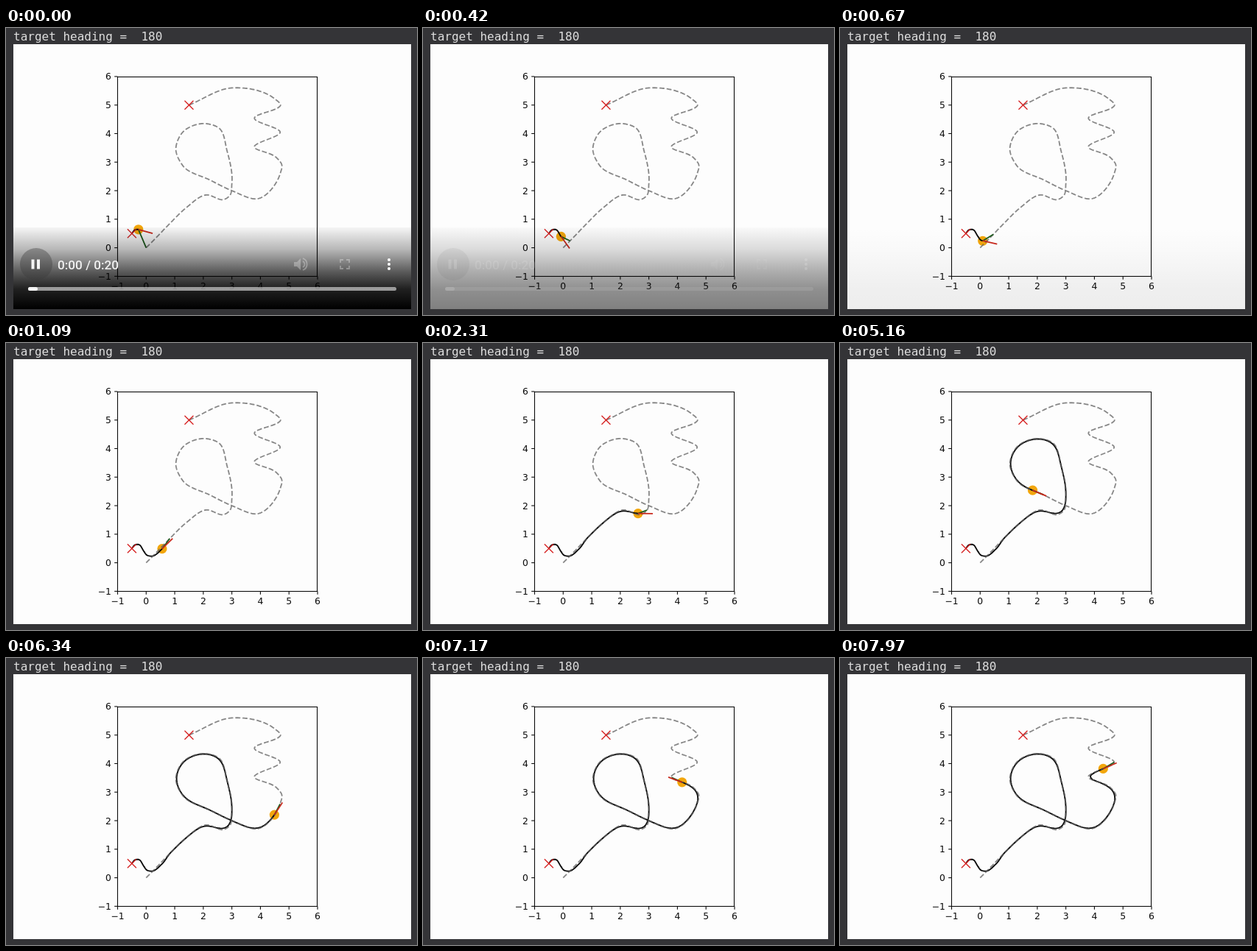
Animation, 558 px wide and 390 px high, one loop 8000 ms. Source, as an HTML page with a canvas:

```html
<!DOCTYPE html>
<html lang="en">
<head>
<meta charset="utf-8">
<title>Path tracking</title>
<style>
  html, body { margin: 0; width: 100%; height: 100%; overflow: hidden; background: #343437; }
  canvas { display: block; }
</style>
</head>
<body>
<canvas id="stage" width="558" height="390"></canvas>
<script>
const ctx = document.getElementById('stage').getContext('2d');
const LOOP = 8000, FIRST_STEP = 130, STEP = 41.85;
const UNIT = 38.78, ORIGIN = { x: 190.3, y: 298.6 };
const BOX = { left: 151.5, top: 66.5, right: 422.5, bottom: 337.5 };

const toX = n => ORIGIN.x + n * UNIT;
const toY = n => ORIGIN.y - n * UNIT;
const toStage = ([x, y, time]) => ({ x: toX(x), y: toY(y), time });

// Key points as [x, y, time]; the time is optional and otherwise derived.
const plan = makeRoute([
  [0, 0, 0], [.24, .24, 420], [.82, .84, 1090], [1.4, 1.4], [2.1, 1.85], [2.75, 1.7],
  [2.92, 1.82], [3, 2.25], [2.83, 3.4], [2.54, 4.2], [2.08, 4.35, 3570], [1.28, 4.05],
  [1.04, 3.45], [1.28, 2.88], [2.24, 2.37, 5160], [3, 2], [3.92, 1.72], [4.7, 2.62, 6340],
  [4.75, 2.9], [4.58, 3.14], [3.79, 3.53], [4.69, 4.05, 7970], [3.79, 4.54], [4.69, 5.05],
  [4.5, 5.22], [3, 5.6], [1.5, 5, 14000]
].map(toStage));

const approach = [
  [-.5, .5, -300], [-.4, .62], [-.27, .64, 0], [-.08, .4, 420], [.02, .27], [.18, .23], [.55, .48, 1090]
].map(toStage);

const trail = makeRoute([...approach, ...follow(1200)]);

// The robot trails the goal on a smoothed copy of the plan, so it cuts corners.
function follow(since) {
  const mean = (list, key) => list.reduce((sum, p) => sum + p[key], 0) / list.length;
  return plan.flatMap((goal, i) => {
    if (goal.time < since || i % 8) return [];
    const behind = plan.slice(i - 28, i - 3);
    return [{ x: mean(behind, 'x'), y: mean(behind, 'y'), time: goal.time }];
  });
}

// Smooth curve through the points; it is travelled more slowly where it bends.
function makeRoute(points) {
  const chords = points.slice(1).map((p, i) => {
    const dx = p.x - points[i].x, dy = p.y - points[i].y, d = Math.hypot(dx, dy);
    return { d, x: dx / d, y: dy / d };
  });
  const tangents = points.map((p, i) => {
    const a = chords[i - 1] || chords[i], b = chords[i] || a;
    const blend = key => (b.d * a[key] + a.d * b[key]) / (a.d + b.d);
    return { x: blend('x'), y: blend('y') };
  });
  const samples = [{ ...points[0], cost: 0 }], anchors = [0];

  chords.forEach(({ d }, i) => {
    const p = points[i], q = points[i + 1], n = Math.ceil(d);
    for (let j = 1; j <= n; j++) {
      const u = j / n, v = 1 - u;
      const at = key => v * v * (1 + 2 * u) * p[key] + u * u * (1 + 2 * v) * q[key]
        + d * u * v * (v * tangents[i][key] - u * tangents[i + 1][key]);
      const last = samples[samples.length - 1], x = at('x'), y = at('y');
      const dx = x - last.x, dy = y - last.y, angle = Math.atan2(dy, dx);
      const turn = angle - (last.angle ?? angle);
      const bend = Math.abs(Math.atan2(Math.sin(turn), Math.cos(turn)));
      samples.push({ x, y, angle, cost: last.cost + 7.8 * Math.hypot(dx, dy) + 210 * bend });
    }
    if (q.time !== undefined) {
      samples[samples.length - 1].time = q.time;
      anchors.push(samples.length - 1);
    }
  });

  anchors.slice(1).forEach((end, i) => {
    const a = samples[anchors[i]], b = samples[end];
    for (const s of samples.slice(anchors[i] + 1, end))
      s.time = a.time + (b.time - a.time) * (s.cost - a.cost) / (b.cost - a.cost);
  });
  return samples;
}

function locate(route, time) {
  const next = route.findIndex(s => s.time > time);
  const a = route[next - 1], b = route[next];
  const u = (time - a.time) / (b.time - a.time);
  return { next, x: a.x + (b.x - a.x) * u, y: a.y + (b.y - a.y) * u, angle: b.angle };
}

function stroke(points, color, width, dash = []) {
  ctx.beginPath();
  points.forEach(p => ctx.lineTo(p.x, p.y));
  ctx.strokeStyle = color;
  ctx.lineWidth = width;
  ctx.setLineDash(dash);
  ctx.stroke();
  ctx.setLineDash([]);
}
const line = (x1, y1, x2, y2, color, width) =>
  stroke([{ x: x1, y: y1 }, { x: x2, y: y2 }], color, width);

function disc(x, y, r, color) {
  ctx.beginPath();
  ctx.arc(x, y, r, 0, 7);
  ctx.fillStyle = color;
  ctx.fill();
}

function rect(x, y, w, h, color, radius = 0) {
  ctx.beginPath();
  ctx.roundRect(x, y, w, h, radius);
  ctx.fillStyle = color;
  ctx.fill();
}

function text(str, x, y, font, color, align = 'left') {
  ctx.font = font;
  ctx.fillStyle = color;
  ctx.textAlign = align;
  ctx.fillText(str, x, y);
}

function cross({ x, y }) {
  line(x - 6, y - 6, x + 6, y + 6, '#d62020', 1.3);
  line(x - 6, y + 6, x + 6, y - 6, '#d62020', 1.3);
}

function drawAxes() {
  const font = '12.4px "DejaVu Sans", sans-serif', ink = '#0c0c0c';
  ctx.strokeStyle = ink;
  ctx.lineWidth = 1.1;
  ctx.strokeRect(BOX.left, BOX.top, BOX.right - BOX.left, BOX.bottom - BOX.top);
  for (let n = -1; n <= 6; n++) {
    const x = toX(n), y = toY(n), label = String(n).replace('-', '\u2212');
    line(x, BOX.bottom, x, BOX.bottom + 4.3, ink, 1.1);
    line(BOX.left - 4.3, y, BOX.left, y, ink, 1.1);
    text(label, x, 355, font, ink, 'center');
    text(label, 143, y + 4.5, font, ink, 'right');
  }
}

function drawShade(alpha) {
  const shade = ctx.createLinearGradient(0, 271, 0, 382);
  [[0, .03], [.27, .28], [.55, .65], [.75, .87], [1, 1]]
    .forEach(([at, a]) => shade.addColorStop(at, `rgba(0,0,0,${a * alpha})`));
  rect(10, 271, 540, 111, shade);
}

function drawControls(alpha) {
  ctx.save();
  ctx.globalAlpha = alpha;
  disc(41, 321, 22, 'rgba(60,60,60,.4)');
  rect(34.5, 314.5, 4, 13, '#f4f4f4');
  rect(42, 314.5, 4, 13, '#f4f4f4');
  text('0:00 / 0:20', 70, 327.5, '500 17.2px Roboto, sans-serif', '#f0f0f0');

  const faint = 'rgba(255,255,255,.3)';
  ctx.fillStyle = ctx.strokeStyle = faint;
  ctx.lineWidth = 1.8;
  ctx.fill(new Path2D('M391 318h4l5-5v16l-5-5h-4z'));
  ctx.stroke(new Path2D('M403 317a4.5 4.5 0 0 1 0 8M403 313a8.5 8.5 0 0 1 0 16'
    + 'M454 319v-4h4M462 315h4v4M466 323v4h-4M458 327h-4v-4'));
  for (const dy of [-6, 0, 6]) disc(520, 321 + dy, 2, '#fff');

  rect(30, 352, 500, 5, 'rgba(255,255,255,.55)', 2.5);
  rect(30, 352, 13, 5, '#f4f4f4', 2.5);
  ctx.restore();
}

function draw(now) {
  const t = now % LOOP;
  const step = Math.floor((t - 122) / STEP);
  const time = step < 0 ? 0 : Math.min(FIRST_STEP + step * STEP, LOOP);
  const robot = locate(trail, time), goal = locate(plan, time);
  const fade = Math.max(0, Math.min(1, 1 - (time - FIRST_STEP) / 580));

  rect(0, 0, 558, 390, '#343437');
  text('target heading =  180', 10, 17, '16px "DejaVu Sans Mono", monospace', '#dedede');
  rect(10, 22, 540, 360, '#fdfdfd');
  drawAxes();

  disc(robot.x, robot.y, 6.6, '#f2a60c');
  stroke([...trail.slice(0, robot.next), robot], '#0c0c0c', 1.9);
  stroke(plan, 'rgba(96,96,96,.75)', 1.8, [6.8, 2.9]);
  line(robot.x, robot.y, goal.x, goal.y, '#1c5c1c', 1.8);
  line(robot.x, robot.y, robot.x + 20 * Math.cos(robot.angle),
    robot.y + 20 * Math.sin(robot.angle), '#c8281c', 1.8);
  cross(trail[0]);
  cross(plan[plan.length - 1]);

  drawShade(fade);
  drawControls(fade ** 2.5);
}

let start;
function tick(now) {
  start ??= now;
  draw(Math.max(0, now - start));
  requestAnimationFrame(tick);
}
draw(0);
requestAnimationFrame(tick);
</script>
</body>
</html>
```
